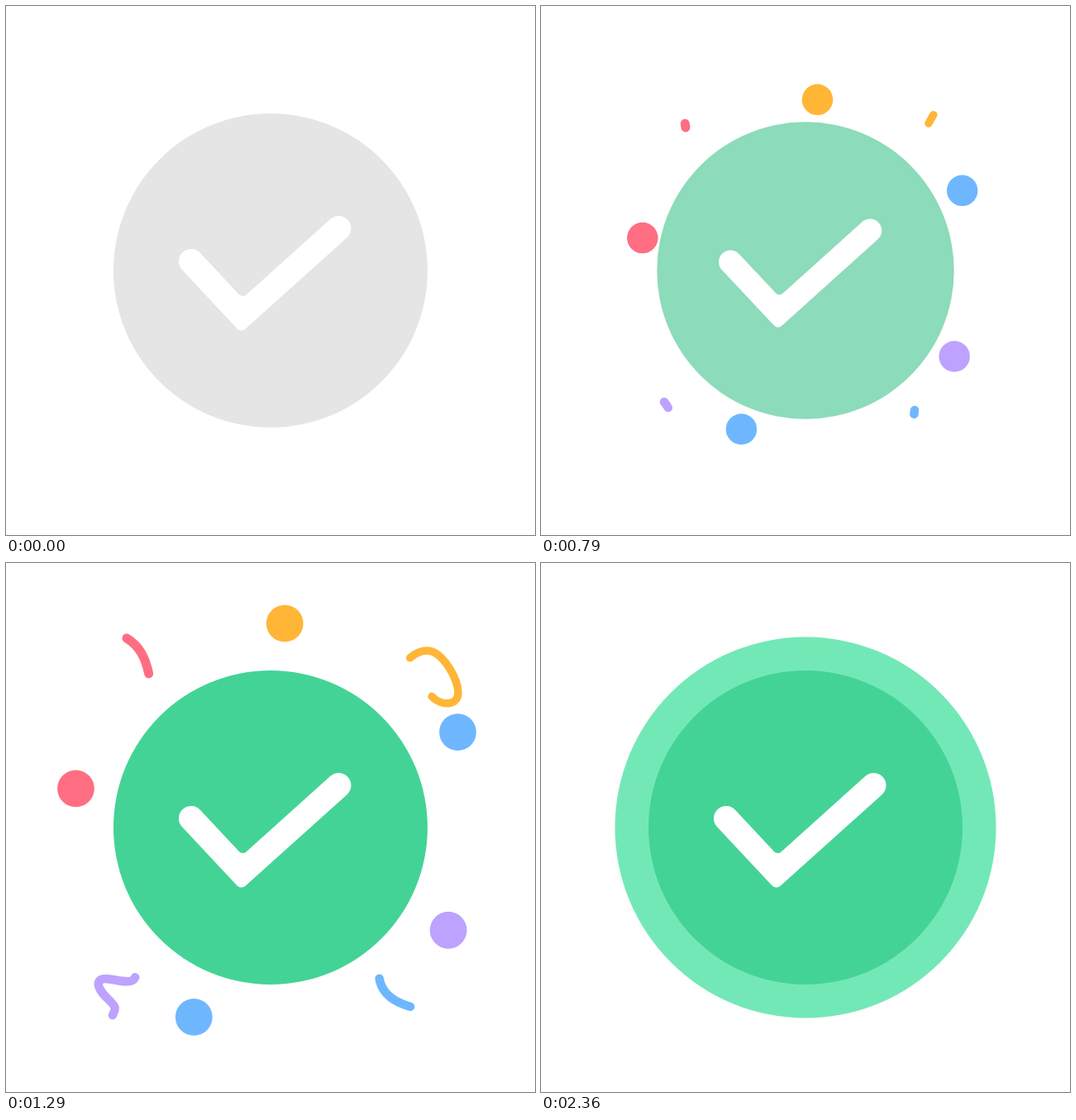
An HTML page with a canvas that plays this animation: 640 by 640 pixels, repeating every 2.43 s.

```html
<!DOCTYPE html>
<html lang="en">
<head>
<meta charset="utf-8">
<title>Success check</title>
<style>
html, body { margin: 0; width: 100%; height: 100%; overflow: hidden; background: #fff; }
canvas, svg { position: absolute; top: 0; left: 0; width: 100%; height: 100%; }
svg { fill: none; stroke-linecap: round; stroke-linejoin: round; }
</style>
</head>
<body>
<canvas id="stage" width="640" height="640"></canvas>
<svg id="ribbons" viewBox="0 0 640 640"></svg>
<script>
const ctx = document.getElementById('stage').getContext('2d');
const svg = document.getElementById('ribbons');
const LOOP = 2430, FPS = 14, MID = 320, RADIUS = 190, DOT = 22.4;
const RED = '#ff6e82', YELLOW = '#ffb637', PURPLE = '#bda2ff', BLUE = '#6eb7ff';
const GRAY = [229, 229, 229], GREEN = [68, 211, 150];

// Angle in degrees and distance from the centre
const dots = [
  { angle: -86, dist: 247.6, color: YELLOW },
  { angle: -27, dist: 254.4, color: BLUE },
  { angle: 30, dist: 248.6, color: PURPLE },
  { angle: 112, dist: 247.5, color: BLUE },
  { angle: 191.3, dist: 240.3, color: RED }
];

const ribbons = [
  { color: RED, width: 11, d: 'M175 147C171 119 164 102 146 91C133 82 115 79 97 77' },
  { color: YELLOW, width: 9.5, d: 'M469 142C481 118 496 106 509 106C528 106 547 140 547 157' +
    'C547 176 520 172 512 157C500 134 526 106 548 101S582 99 597 104' },
  { color: PURPLE, width: 10.5, d: 'M149 479C156 487 161 500 153 505C146 509 131 503 120 503' +
    'S109 513 121 525S134 537 129 547C124 557 84 512 82 543C83 556 88 568 86 578' },
  { color: BLUE, width: 10.5, d: 'M452 489C448 512 461 529 490 537C505 541 513 546 517 550S530 561 522 568' }
];

svg.innerHTML = ribbons.map(({ color, width, d }) =>
  `<path d="${d}" stroke="${color}" stroke-width="${width}" pathLength="1"/>`).join('');

function linear(t, from, to) {
  return Math.min(1, Math.max(0, (t - from) / (to - from)));
}

function ease(t, from, to) {
  const x = linear(t, from, to);
  return x * x * (3 - 2 * x);
}

function polar(x, y, angle, dist) {
  return [x + Math.cos(angle) * dist, y + Math.sin(angle) * dist];
}

function disc(x, y, r, color) {
  ctx.fillStyle = color;
  ctx.beginPath();
  ctx.arc(x, y, r, 0, Math.PI * 2);
  ctx.fill();
}

// Dots burst out, then drift back while fading
function drawDots(t) {
  if (t < 570) return;
  const scale = 1.003 - Math.exp((565 - t) / 123) - 0.07 * ease(t, 1230, 2214);
  ctx.globalAlpha = 1 - ease(t, 1436, 2420);
  for (const { angle, dist, color } of dots) {
    const [x, y] = polar(MID, MID, angle * Math.PI / 180, dist * scale);
    disc(x, y, DOT * scale, color);
  }
  ctx.globalAlpha = 1;
}

// Each ribbon shows the stretch of its path between tail and head
function drawRibbons(t) {
  const head = ease(t, 643, 1833), tail = ease(t, 1082, 2051);
  svg.style.visibility = head > tail ? 'visible' : 'hidden';
  svg.style.strokeDasharray = `${Math.max(0, head - tail)} 2`;
  svg.style.strokeDashoffset = -tail;
}

function drawTick() {
  const [ax, ay] = [224, 309], [vx, vy] = [285.3, 374.4], [bx, by] = [402.5, 269];
  const r = 15, q = Math.PI / 2;
  const a = Math.atan2(vy - ay, vx - ax), b = Math.atan2(by - vy, bx - vx);
  const mid = (a + b) / 2, miter = r / Math.cos((a - b) / 2);
  ctx.fillStyle = '#fff';
  ctx.beginPath();
  ctx.arc(ax, ay, r, a + q, a + 3 * q);
  ctx.arcTo(...polar(vx, vy, mid - q, miter), ...polar(bx, by, b - q, r), 6);
  ctx.arc(bx, by, r, b - q, b + q);
  ctx.arcTo(...polar(vx, vy, mid + q, miter), ...polar(ax, ay, a + q, r), 7);
  ctx.fill();
}

function drawBadge(t) {
  const scale = 1 - 0.731 * ease(428.6 - Math.abs(t - 428.6), 0, 428.6);
  const mix = linear(t, 372, 1124);
  const rgb = GRAY.map((v, i) => Math.round(v + (GREEN[i] - v) * mix));
  ctx.save();
  ctx.translate(MID, MID);
  ctx.scale(scale, scale);
  ctx.translate(-MID, -MID);
  disc(MID, MID, RADIUS, `rgb(${rgb})`);
  drawTick();
  ctx.restore();
}

function draw(t) {
  ctx.fillStyle = '#fff';
  ctx.fillRect(0, 0, 640, 640);
  const grow = ease(t, 1930, 2430);
  if (grow) disc(MID, MID, RADIUS + 43 * grow, '#73e8b7');
  drawDots(t);
  drawBadge(t);
  drawRibbons(t);
}

const start = performance.now();
function tick(now) {
  const t = Math.max(0, now - start) % LOOP;
  // The motion is stepped at a fixed rate
  const step = Math.min(33, Math.floor((t + 5) * FPS / 1000));
  draw(step * 1000 / FPS);
  requestAnimationFrame(tick);
}
tick(start);
</script>
</body>
</html>
```
